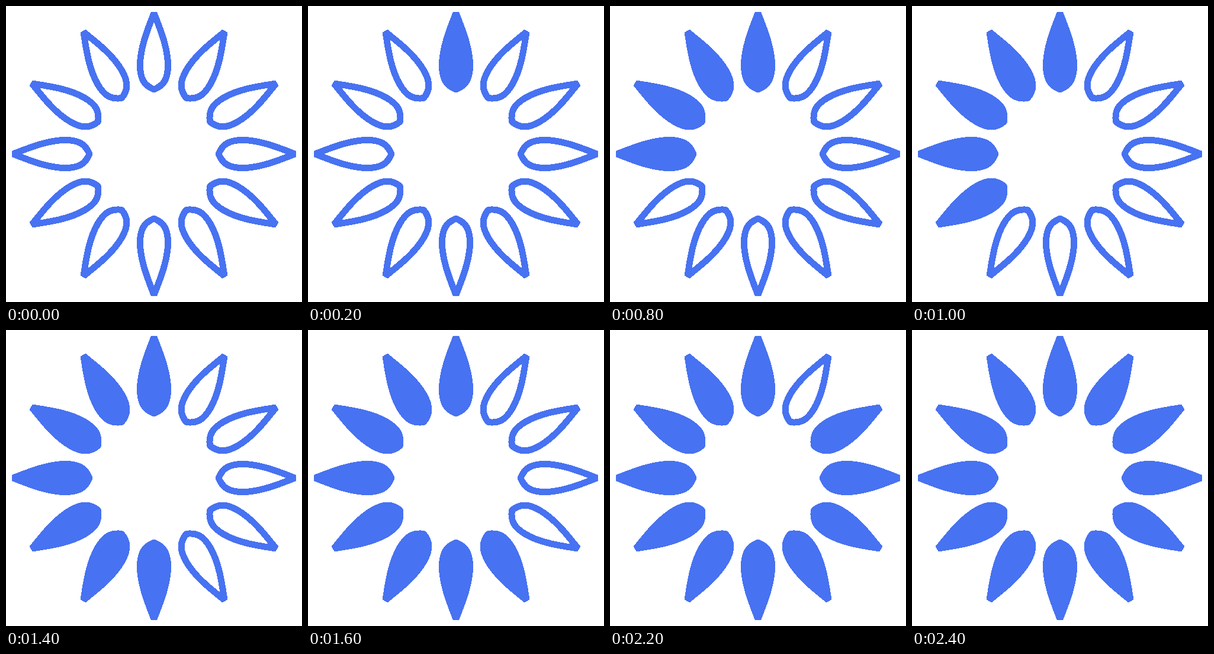
An HTML page for the animation above (2.6 s loop, 500 by 500 pixels).

```html
<!DOCTYPE html>
<html lang="en">
<head>
<meta charset="utf-8">
<title>Petal loader</title>
<style>
  html, body { margin: 0; width: 100%; height: 100%; overflow: hidden; background: #fff; }
  svg { display: block; width: 100%; height: 100%; }
  path {
    fill: #4772f1;
    fill-opacity: 0;
    stroke: #4772f1;
    stroke-width: 11;
    stroke-linejoin: bevel;
    shape-rendering: crispEdges;
  }
</style>
</head>
<body>
<svg id="flower" viewBox="0 0 500 500"></svg>
<script>
  const PETALS = 12;
  const STEP = 200;
  const LOOP = STEP * (PETALS + 1);
  // One upright petal, relative to the flower's centre
  const SHAPE = 'M0-238 C8.5-216 23.5-181 23.5-150 C23.5-125 15.5-115.5 0-109' +
                ' C-15.5-115.5-23.5-125-23.5-150 C-23.5-181-8.5-216 0-238Z';
  const flower = document.getElementById('flower');

  for (let i = 0; i < PETALS; i++) {
    const petal = document.createElementNS('http://www.w3.org/2000/svg', 'path');
    petal.setAttribute('d', SHAPE);
    petal.setAttribute('transform', `translate(250 250) rotate(${-360 / PETALS * i})`);
    flower.append(petal);

    // Petals fill one by one, counter-clockwise from the top
    const anim = petal.animate([
      { fillOpacity: 0, offset: 0, easing: 'step-end' },
      { fillOpacity: 1, offset: STEP * (i + 1) / LOOP, easing: 'step-end' },
      { fillOpacity: 1, offset: 1 }
    ], { duration: LOOP, iterations: Infinity });
    anim.startTime = 0;
  }
</script>
</body>
</html>
```
